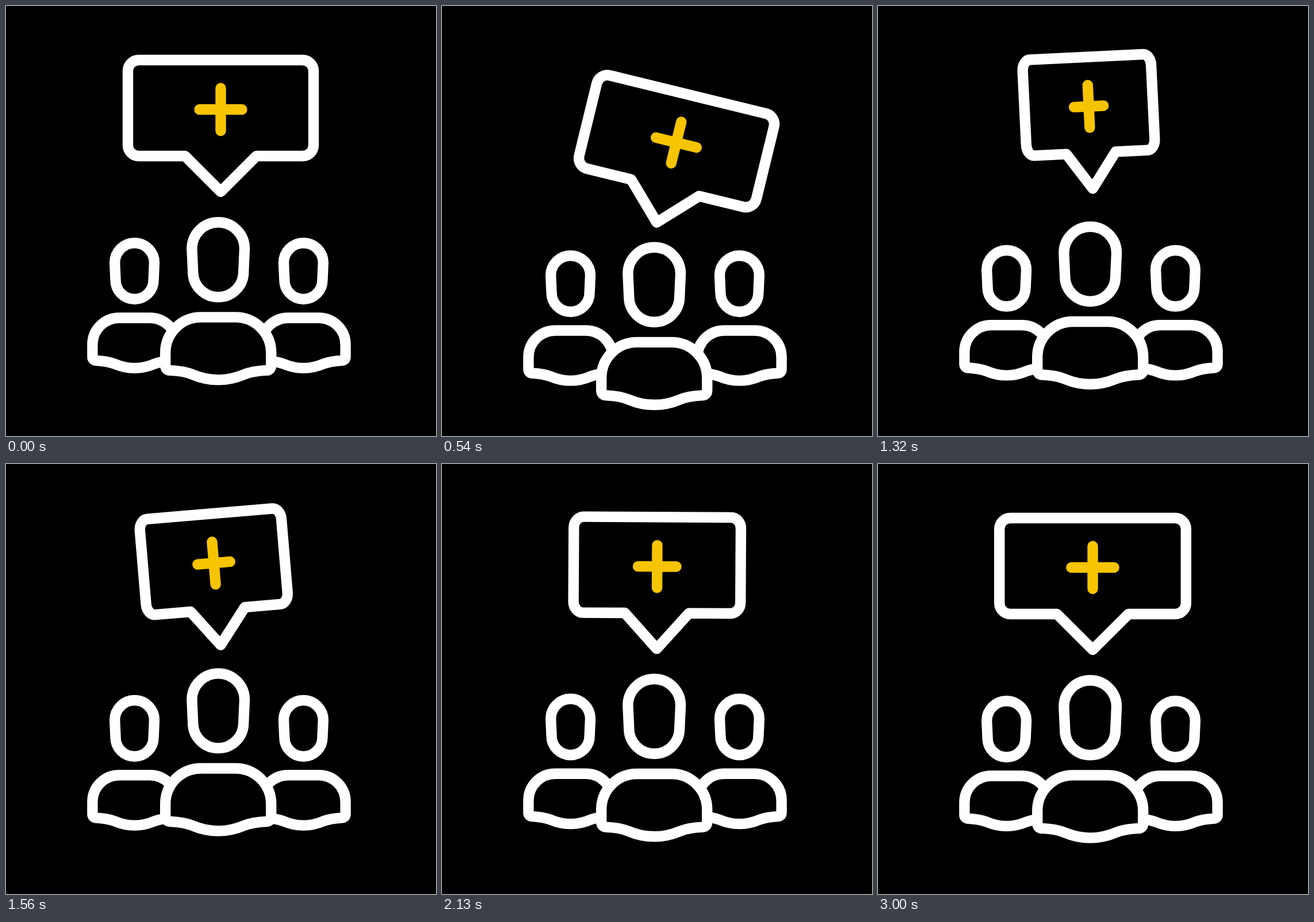
Animation, 748 px wide and 748 px high, one loop 3.59 s. Source, as an HTML page with a canvas:

```html
<!DOCTYPE html>
<html lang="en">
<head>
<meta charset="utf-8">
<title>Group message</title>
<style>
  html, body { margin: 0; height: 100%; overflow: hidden; background: #000; }
  canvas { display: block; }
</style>
</head>
<body>
<canvas width="748" height="748"></canvas>
<script>
const LOOP = 3590, STEP = 30, END = 3000;
const ctx = document.querySelector("canvas").getContext("2d");
ctx.lineWidth = 18.4;
ctx.lineCap = ctx.lineJoin = "round";

// Head of radius r above a rounded body of half-width w and height h.
function person(x, headTop, bodyTop, r, w, h) {
  const p = new Path2D();
  const crown = headTop + r, chin = crown + 0.88 * r, jaw = 0.96 * r;
  p.arc(x, crown, r, Math.PI, 0);
  p.arc(x, chin, jaw, 0, Math.PI);
  p.closePath();

  const bottom = bodyTop + h, hem = bottom - 0.36 * r, wave = bottom - 0.2 * r;
  const shoulder = 1.35 * r, side = hem - 0.2 * r;
  p.moveTo(x - w, side);
  p.arcTo(x - w, bodyTop, x, bodyTop, shoulder);
  p.arcTo(x + w, bodyTop, x + w, side, shoulder);
  p.lineTo(x + w, side);
  p.quadraticCurveTo(x + w, hem, x + 0.9 * w, hem);
  p.quadraticCurveTo(x + 0.65 * w, hem + 1, x + 0.48 * w, wave);
  p.bezierCurveTo(x + 0.17 * w, bottom + 3, x - 0.17 * w, bottom + 3, x - 0.48 * w, wave);
  p.quadraticCurveTo(x - 0.65 * w, hem + 1, x - 0.9 * w, hem);
  p.quadraticCurveTo(x - w, hem, x - w, side);
  p.closePath();
  return p;
}

const left = person(223.6, 412.3, 542.5, 34.4, 73.2, 86.7);
const right = person(517.4, 412.3, 542.5, 34.4, 73.2, 86.7);
const middle = person(369.2, 376.3, 541.4, 45.8, 92, 109);

// Bubble and plus are measured from the bubble's tip.
const bubble = new Path2D("M0 0L-62-62H-142.500a19 19 0 0 1-19-19V-210a19 19 0 0 1 19-19H142.500a19 19 0 0 1 19 19V-81a19 19 0 0 1-19 19H62Z");
const plus = new Path2D("M-37-143H37M0-180V-106");

const smooth = u => u * u * (3 - 2 * u);

// Eases through [time, value, skew] poses; a skew above 1 delays the move.
function ease(t, ...poses) {
  const next = poses.findIndex(pose => pose[0] > t);
  if (next < 0) return poses.at(-1)[1];
  if (next === 0) return poses[0][1];
  const [t0, v0] = poses[next - 1], [t1, v1, skew = 1] = poses[next];
  return v0 + (v1 - v0) * smooth(((t - t0) / (t1 - t0)) ** skew);
}

function paint(path, color, matrix, fill) {
  const shape = new Path2D();
  shape.addPath(path, matrix);
  if (fill) ctx.fill(shape);
  ctx.strokeStyle = color;
  ctx.stroke(shape);
}

function draw(now) {
  const t = Math.min(END, Math.floor(now % LOOP / STEP) * STEP);
  const middleY = ease(t, [0, 0], [630, 46], [1570, -12, 1.6], [2350, 0]);
  const sidesY = ease(t, [0, 0], [720, 26], [1790, -9, 1.5], [2400, 0]);
  const bubbleY = ease(t, [0, 0], [600, 55], [1450, -8.5, 0.85], [2400, 0]);
  const angle = ease(t, [0, 0], [640, 14.7], [1490, -4.8], [2350, 4, 2], [3000, 0]);
  const width = ease(t, [470, 1], [1000, 0.63], [1750, 0.79], [2500, 1.005]);

  ctx.fillStyle = "#000";
  ctx.fillRect(0, 0, 748, 748);
  const down = y => new DOMMatrix().translate(0, y);
  paint(left, "#fff", down(sidesY), true);
  paint(right, "#fff", down(sidesY), true);
  paint(middle, "#fff", down(middleY), true);

  const pose = new DOMMatrix().translate(373.5, 323 + bubbleY).rotate(angle).scale(width, 1);
  paint(bubble, "#fff", pose);
  paint(plus, "#f6c400", pose);
}

const start = performance.now();
(function tick() {
  draw(performance.now() - start);
  requestAnimationFrame(tick);
})();
</script>
</body>
</html>
```
